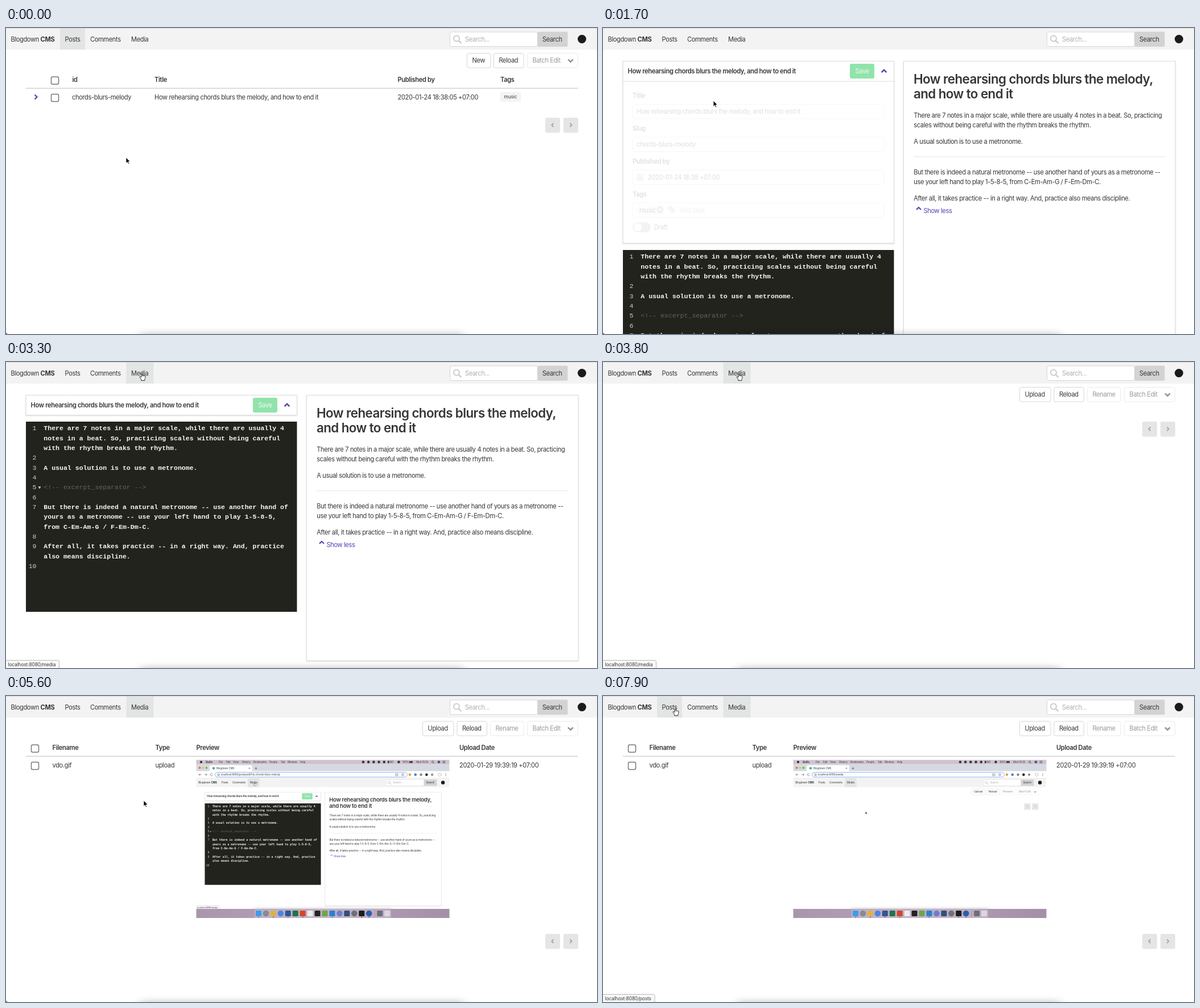
Animation of 1039x539 px, one loop 8 s. Source, as an HTML page:

```html
<!DOCTYPE html>
<html lang="en">
<head>
<meta charset="utf-8">
<title>Blogdown CMS</title>
<style>
html, body { margin: 0; width: 100%; height: 100%; overflow: hidden; background: #fff; }
svg { display: block; width: 100vw; height: 100vh; }
text { font: 11.1px Inter, "Open Sans", sans-serif; letter-spacing: -.033em; fill: #363636; font-optical-sizing: none; white-space: pre; }
.b { font-weight: 600; letter-spacing: -.03em; }
.h1 { font-size: 22.4px; font-weight: 600; letter-spacing: -.027em; }
.s { font-size: 8.3px; letter-spacing: -.01em; }
.xs { font-size: 4.4px; letter-spacing: -.01em; }
.m { font: 11.56px "Liberation Mono", "Courier New", monospace; letter-spacing: 0; fill: #d0d0c8; }
.code { font-weight: 700; fill: #f8f8f2; }
.dim { fill: #64645c; }
.card { fill: #fff; stroke: #dcdcdc; filter: drop-shadow(0 1px 1.2px rgba(10, 10, 10, .14)); }
.btn { fill: #fff; stroke: #d6d6d6; }
</style>
</head>
<body>
<svg id="stage" viewBox="0 0 1039 539" preserveAspectRatio="none"></svg>
<script>
const LOOP = 8000, STEP = 100;
const PURPLE = '#5442b5';
const HEADLINE = ['How rehearsing chords blurs the melody,', 'and how to end it'];
const TITLE = HEADLINE.join(' ');
const SLUG = 'chords-blurs-melody';
const CODE = [
  ['There are 7 notes in a major scale, while there are usually 4',
    'notes in a beat. So, practicing scales without being careful',
    'with the rhythm breaks the rhythm.'],
  [''],
  ['A usual solution is to use a metronome.'],
  [''],
  ['&lt;!-- excerpt_separator --&gt;'],
  [''],
  ['But there is indeed a natural metronome -- use another hand of',
    'yours as a metronome -- use your left hand to play 1-5-8-5,',
    'from C-Em-Am-G / F-Em-Dm-C.'],
  [''],
  ['After all, it takes practice -- in a right way. And, practice',
    'also means discipline.'],
  ['']
];
const TABS = [['Posts', 95, 44], ['Comments', 139.5, 72], ['Media', 211.5, 48]];
// time, x, y of the pointer tip
const PATH = [
  [300, 211, 228], [1100, 194.5, 128], [1800, 194, 128], [2300, 585, 318], [2400, 585, 318],
  [3200, 239, 20], [4000, 239, 20], [4400, 259, 94], [5500, 242, 184], [5600, 242, 184],
  [6400, 78, 94], [7200, 127, 22]
];

const text = (x, y, s, cls = '', attr = '') => `<text x="${x}" y="${y}" class="${cls}" ${attr}>${s}</text>`;
const box = (x, y, w, h, fill, attr = '') => `<rect x="${x}" y="${y}" width="${w}" height="${h}" fill="${fill}" ${attr}/>`;
const dot = (x, y, r, fill, attr = '') => `<circle cx="${x}" cy="${y}" r="${r}" fill="${fill}" ${attr}/>`;
const line = (d, color, w = 1) => `<path d="${d}" fill="none" stroke="${color}" stroke-width="${w}"/>`;
const group = (attr, s) => `<g ${attr}>${s}</g>`;
const chevron = (x, y, turn, color, r = 3.6, w = 2.2) =>
  group(`transform="translate(${x} ${y}) rotate(${turn})"`, line(`M${-r / 2} ${-r}L${r / 2} 0L${-r / 2} ${r}`, color, w));
const check = (x, y) => box(x, y, 13, 13, 'none', 'rx="2.5" stroke="#777" stroke-width="1.5"');
const lens = (x, y, r, color, w) => dot(x, y, r, 'none', `stroke="${color}" stroke-width="${w}"`) +
  line(`M${x + r * .7} ${y + r * .7}l${r} ${r}`, color, w * 1.2);

function button(x, w, label, off, pad = 9) {
  return group(off ? 'opacity=".5"' : '',
    box(x, 44.5, w, 25.5, '#fff', 'class="btn" rx="3"') + text(x + pad, 61.2, label));
}

function batchButton() {
  return button(916.5, 89, 'Batch Edit', true) + group('opacity=".6"', chevron(992.5, 57.5, 90, '#4a4a4a', 4.4, 2.5));
}

function pager(y) {
  return [[948, 180], [980, 0]].map(([x, turn]) =>
    box(x, y - 13, 26, 26.5, '#e5e5e5', 'rx="3"') + chevron(x + 13, y, turn, '#a9a9a9', 3.2, 2)).join('');
}

function navbar(active, hover) {
  let s = box(0, 0, 1039, 38, '#f3f3f3') + box(0, 0, 1039, 1, '#d9d9d9');
  for (const [name, x, w] of TABS) {
    if (name === active || name === hover) s += box(x, 1, w, 37, '#e2e5e4');
    s += text(x + 8.5, 23.8, name);
  }
  return s + text(8.5, 23.8, 'Blogdown <tspan style="font-weight:700">CMS</tspan>') +
    box(780.5, 7, 154, 25.5, '#fff', 'rx="3" stroke="#d6d6d6"') + lens(792, 18.5, 5, '#cbcbcb', 2) +
    text(807, 23.8, 'Search...', '', 'style="fill:#b0b0b0"') +
    box(934.5, 6.5, 53, 26.5, '#d3d3d3', 'rx="2"') + text(943, 23.8, 'Search') +
    dot(1012.5, 19.5, 7.5, '#1b1b1b');
}

function postsPage(hover) {
  return button(810.5, 41.5, 'New') + button(857.5, 52.5, 'Reload') + batchButton() +
    (hover ? box(35, 106, 970.5, 34, '#a4d1e2') : '') + box(35, 105.5, 970.5, 1.4, '#cfcfcf') +
    check(79.5, 86) + check(79.5, 116.5) +
    [[116.5, 'id'], [261, 'Title'], [688.5, 'Published by'], [869, 'Tags']].map(([x, s]) => text(x, 95.3, s, 'b')).join('') +
    chevron(52.5, 121.5, 0, PURPLE, 4) +
    text(116, 125.6, SLUG) + text(261, 125.6, TITLE) + text(688.5, 125.6, '2020-01-24 18:38:05 +07:00') +
    box(869, 113, 36.5, 17, '#f4f4f4', 'rx="3"') + text(875.5, 124.3, 'music', 's') + pager(171);
}

function form(opacity) {
  const field = (y, label) => text(52, y, label, 'b') +
    box(52, y + 11, 442, 25.5, '#fff', 'rx="3" stroke="#c8c8c8"');
  return group(`opacity="${opacity}"`,
    field(123.3, 'Title') + text(59, 151, TITLE) +
    field(181.2, 'Slug') + text(59, 208.8, SLUG) +
    field(239, 'Published by') + box(59, 257, 12, 12, '#c4c4c4', 'rx="1"') + box(59, 259.5, 12, 1, '#fff') +
    text(79, 266.5, '2020-01-24 18:38 +07:00') +
    field(297, 'Tags') + box(59, 312, 48, 17, '#f4f4f4', 'rx="3"') + text(64, 324.5, 'music') +
    dot(100, 320, 6, '#aaa') + line('M98 318l4 4m0-4l-4 4', '#fff', 1.2) +
    '<path d="M114.5 313.5h6l7.5 7.5-5.5 6-8-7.5z" fill="#c4c4c4"/>' +
    text(135, 324.5, 'Add tags', '', 'style="fill:#a8a8a8"') +
    box(52, 342, 32, 18, '#b5b5b5', 'rx="9"') + dot(61, 351, 7, '#fff') + text(89.5, 355, 'Draft'));
}

function editor(top, fold) {
  let s = box(35, top, 476.5, 335, '#22231d'), y = top + 15.3;
  CODE.forEach((rows, i) => {
    s += text(53.5, y, i + 1, 'm', 'text-anchor="end"');
    if (i === 4 && fold) s += `<path d="M56.5 ${y - 5}h5l-2.5 4.5z" fill="#d0d0c8"/>`;
    for (const row of rows) {
      s += text(66.3, y, row, i === 4 ? 'm dim' : 'm code');
      y += 17.33;
    }
  });
  return s;
}

function preview(bottom, hover) {
  const body = [
    [158, 'There are 7 notes in a major scale, while there are usually 4 notes in a beat. So, practicing'],
    [175.4, 'scales without being careful with the rhythm breaks the rhythm.'],
    [204.4, 'A usual solution is to use a metronome.'],
    [257.7, 'But there is indeed a natural metronome -- use another hand of yours as a metronome --'],
    [275, 'use your left hand to play 1-5-8-5, from C-Em-Am-G / F-Em-Dm-C.'],
    [304, 'After all, it takes practice -- in a right way. And, practice also means discipline.']
  ];
  const link = hover ? '#363636' : PURPLE;
  return box(528.5, 58.5, 477.5, bottom - 58.5, '#fff', 'class="card"') +
    HEADLINE.map((s, i) => text(546, 98 + 26 * i, s, 'h1')).join('') +
    body.map(([y, s]) => text(546.3, y, s)).join('') +
    box(546, 226, 442, 1.4, '#ececec') +
    chevron(555, 318, -90, link, 4) + text(563.5, 325.6, 'Show less', '', `style="fill:${link}"`);
}

function editPage(fade, linkHover) {
  const open = fade > 0;
  return box(35, 58.5, 476.5, open ? 320.5 : 35, '#fff', 'class="card"') +
    (open ? box(35, 93.5, 476.5, 1, '#dedede') + form(fade) : '') +
    text(43.5, 80, TITLE, 'b') +
    box(434, 63, 43, 26, '#91e3ab', 'rx="3"') + text(443.5, 80, 'Save', '', 'style="fill:#eefbf2"') +
    chevron(494, 76, -90, PURPLE, 4.4, 2.4) +
    editor(open ? 391 : 105, !open) + preview(open ? 600 : 526, linkHover);
}

function mediaButtons() {
  return button(732.5, 54.5, 'Upload') + button(793, 52.5, 'Reload') + button(851.5, 58.5, 'Rename', true) + batchButton();
}

function mediaPage(t) {
  return mediaButtons() + box(35, 105.5, 970.5, 1.4, '#cfcfcf') + check(44.5, 86) + check(44.5, 116.5) +
    [[81.5, 'Filename'], [262.5, 'Type'], [334.5, 'Preview'], [797, 'Upload Date']].map(([x, s]) => text(x, 95.3, s, 'b')).join('') +
    text(81.5, 125.6, 'vdo.gif') + text(262.5, 125.6, 'upload') + text(797, 125.6, '2020-01-29 19:39:19 +07:00') +
    clip(t) + pager(432);
}

// The desktop recording shown in the preview column
function clip(t) {
  const moved = t >= 7400;
  const [x, y] = glide([[7300, 239, 20], [7600, 296.5, 138.5]], t);
  const page = box(0, 0, 1039, 539, '#fff') + navbar('Media') +
    (moved ? mediaButtons() + pager(118) : editPage(0)) + shade() +
    (!moved && t >= 4700 ? status('media') : '') + pointer(x, y, !moved);
  return windowTop(moved ? 'media' : 'posts/edit?id=' + SLUG) +
    group('transform="translate(334.5 144.2) scale(.4283)" clip-path="url(#page)"', page) + dock();
}

function windowTop(path) {
  const menu = [[374, 'File'], [387, 'Edit'], [399, 'View'], [415, 'History'], [435, 'Bookmarks'],
    [463, 'People'], [483, 'Tab'], [495, 'Window'], [517, 'Help'], [674, '481'], [697, '100%'], [721, 'Wed 19:35']];
  const tools = ['#e8a33a', '#4a7fd0', '#888', '#222', '#999'];
  let s = box(334.5, 112.5, 445, 8, '#cfc3d0') + dot(343, 116.3, 2, '#222') +
    text(351, 118, 'Quillo', 'xs', 'style="font-weight:700"') +
    menu.map(([x, w]) => text(x, 118, w, 'xs')).join('');
  for (let i = 0; i < 5; i++) s += dot(628 + i * 9.2, 116.3, 2.2, '#333');
  s += box(671, 114.3, 2.5, 4, '#333') + dot(690.5, 116.3, 2.2, '#333') + box(709, 114.8, 6, 3, '#333') +
    lens(750, 116, 1.6, '#333', .6) + dot(761, 116.3, 2.3, '#3d4f9c') +
    line('M767.5 114.7h5m-5 1.6h5m-5 1.6h5', '#333', .6);
  s += box(334.5, 120.5, 445, 12, '#d5dae2') + box(358, 122, 75, 11, '#fff', 'rx="2"') +
    ['#ee6a5f', '#f5bd4f', '#61c454'].map((c, i) => dot(340.5 + i * 6, 126.6, 2, c)).join('') +
    dot(365, 127.3, 2.2, '#41b883') + text(370, 128.9, 'Blogdown CMS', 'xs') +
    line('M426.8 126.3l2.2 2.2m0-2.2l-2.2 2.2M437.5 127.4h4m-2-2v4', '#444', .7);
  s += box(334.5, 132.5, 445, 11.7, '#fff') +
    line('M343.5 138.5h-4.5m2-2l-2 2 2 2M349 138.5h4.5m-2-2l2 2-2 2M363 137.5a2 2 0 1 0 .2 1.8', '#666', .7) +
    box(367.5, 134.4, 338, 8.4, '#fff', 'rx="4.2" stroke="#8db2ee"') +
    dot(373.5, 138.6, 1.9, 'none', 'stroke="#555" stroke-width=".6"') + line('M373.5 138.2v1.5', '#555', .6) +
    text(378, 140.2, 'localhost:8080/' + path, 'xs') +
    box(685, 137, 4, 3.2, 'none', 'stroke="#555" stroke-width=".6"') + dot(697.5, 138.6, 1.8, 'none', 'stroke="#555" stroke-width=".7"') +
    tools.map((c, i) => dot(710 + i * 9.8, 138.6, 2.3, c)).join('') +
    dot(762.5, 138.6, 2.7, '#fff', 'stroke="#999" stroke-width=".6"') +
    [136.8, 138.6, 140.4].map(y => dot(773, y, .6, '#666')).join('');
  return s;
}

function dock() {
  const hues = ['#3b9cf0', '#858b92', '#dfb23c', '#4a86e0', '#2b579a', '#217346', '#d24726', '#ececec', '#222',
    '#67a84a', '#2c7fd0', '#6a7fd0', '#2f5078', '#6e7276', '#1c1c1c', '#2a5fb0', '#6b6f78', '#dcd8de'];
  const round = [1, 2, 3, 11, 13, 15], running = [0, 2, 4, 6, 10, 14, 15];
  let s = box(334.5, 375, 445, 16, 'url(#desk)') + box(437, 375.6, 240, 15.4, '#cbbccf', 'opacity=".6"');
  hues.forEach((c, i) => {
    const x = 444 + 12.95 * i + (i > 15 ? 6 : 0);
    s += round.includes(i) ? dot(x, 383, 5.3, c) : box(x - 5, 378, 10, 10, c, 'rx="1.5"');
    if (running.includes(i)) s += dot(x, 389.8, .7, '#222');
  });
  return s + line('M648.5 377.5v11', '#8d7f92', .6);
}

function shade() {
  return box(236, 540, 568, 30, '#000', 'opacity=".3" filter="url(#soft)"');
}

function status(path, opacity = 1) {
  const w = path === 'media' ? 94 : 91.5;
  return group(`opacity="${opacity}"`,
    `<path d="M-1 525.5H${w - 3}q2.5 0 2.5 2.5V540H-1z" fill="#f8f8f8" stroke="#b9b9b9"/>` +
    text(3.5, 535.6, 'localhost:8080/' + path, 's'));
}

function pointer(x, y, hand) {
  const shape = hand
    ? '<path d="M-1 1V7L-2.6 5.6C-3.8 5-4.4 6-3.6 7.2L-1.2 10.6V12.6H4.8V10.8C5.8 9 6 7.5 6 5.4C6 4.2 4.6 4.2 4.4 5C4.2 3.9 2.9 3.9 2.7 4.7C2.5 3.6 1.2 3.6 1 4.3V1C1-.3-1-.3-1 1Z" fill="#fff" stroke="#111" stroke-width=".9" stroke-linejoin="round"/>'
    : '<path d="M0 0V10.3L2.4 8.1L4 11.7L5.6 11L4 7.5H7.2Z" fill="#000" stroke="#fff" stroke-width=".8"/>';
  return group(`transform="translate(${x} ${y})"`, shape);
}

function glide(keys, t) {
  let a = keys[0];
  for (const b of keys) {
    if (t < b[0]) {
      const p = Math.max(0, (t - a[0]) / (b[0] - a[0] || 1)), e = p * p * (3 - 2 * p);
      return [a[1] + (b[1] - a[1]) * e, a[2] + (b[2] - a[2]) * e];
    }
    a = b;
  }
  return [a[1], a[2]];
}

const DEFS = `<defs>
  <filter id="soft" x="-20%" y="-200%" width="140%" height="500%"><feGaussianBlur stdDeviation="9 7"/></filter>
  <clipPath id="page"><rect width="1039" height="539"/></clipPath>
  <linearGradient id="desk"><stop stop-color="#a995ac"/><stop offset=".5" stop-color="#b7a3ba"/><stop offset="1" stop-color="#a48ea8"/></linearGradient>
</defs>`;

function scene(t) {
  const [x, y] = glide(PATH, t);
  const tab = y < 38 && TABS.find(([, left, w]) => x > left && x < left + w);
  const onRow = t < 1500 && y < 140;
  const onLink = t >= 2200 && t <= 2400;
  const stale = t >= 3800 && t < 4700;
  let active = '', page, bar = '';
  if (t < 1500) {
    active = 'Posts';
    page = postsPage(onRow);
  } else if (t < 3800) {
    page = editPage(t < 1800 ? 1 - .85 * (t - 1500) / 200 : 0, onLink);
  } else {
    active = 'Media';
    page = t < 4000 ? mediaButtons() + pager(118) : mediaPage(t);
  }
  if (t >= 3200 && t < 4700) bar = status('media', t < 3300 ? .6 : 1);
  if (t >= 7200) bar = status('posts', t < 7300 ? .6 : 1);
  return DEFS + box(0, 0, 1039, 539, '#fff') + navbar(active, tab && tab[0]) + page + shade() +
    '<path d="M0 536.5Q.5 538.5 3 539H0z" fill="#222"/>' + bar + pointer(x, y, onRow || onLink || tab || stale);
}

const stage = document.getElementById('stage');
let shown = -1;
function tick() {
  const t = Math.floor(performance.now() % LOOP / STEP) * STEP;
  if (t !== shown) {
    shown = t;
    stage.innerHTML = scene(t);
  }
  requestAnimationFrame(tick);
}
tick();
</script>
</body>
</html>
```
